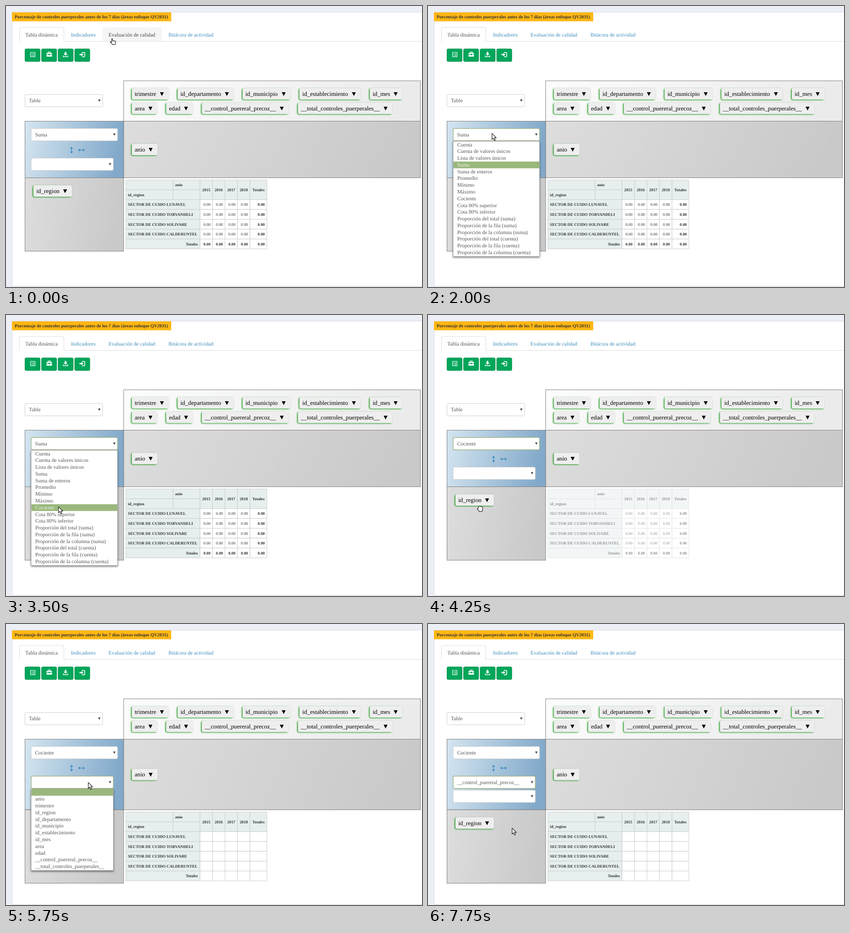
Recreate the animation shown at these times as an HTML page. Size 909 px wide and 616 px high, loop 8 s.

```html
<!DOCTYPE html>
<html lang="es">
<head>
<meta charset="utf-8">
<style>
html, body { margin: 0; width: 100%; height: 100%; overflow: hidden; background: #edeff7; }
svg { display: block; width: 909px; height: 616px; }
text { font-family: "Liberation Serif", "Times New Roman", serif; text-rendering: geometricPrecision; white-space: pre; }
</style>
</head>
<body>
<svg id="stage" viewBox="0 0 909 616" xmlns="http://www.w3.org/2000/svg">
  <defs>
    <linearGradient id="pale" x2="1" y2=".1"><stop stop-color="#fcfcfc"/><stop offset="1" stop-color="#ebebeb"/></linearGradient>
    <linearGradient id="gray" x2="1" y2=".1"><stop stop-color="#dddddd"/><stop offset="1" stop-color="#c9c9c9"/></linearGradient>
    <linearGradient id="blue" x2="1" y2=".1"><stop stop-color="#d4e5f0"/><stop offset="1" stop-color="#82a9ca"/></linearGradient>
    <filter id="glow" x="-20%" y="-40%" width="140%" height="180%"><feDropShadow dx="-1.5" dy="1" stdDeviation="1.7" flood-color="#0a930a"/></filter>
    <filter id="drop" x="-10%" y="-10%" width="120%" height="120%"><feDropShadow dx="0" dy="2" stdDeviation="2.2" flood-color="#000" flood-opacity=".55"/></filter>
  </defs>
</svg>
<script>
const stage = document.getElementById('stage');
const BODY = 11.57, PILL = 13.23, CELL = 8.82;
const INK = '#555', LINK = '#3c8dbc';

function add(parent, tag, attrs, content) {
  const el = document.createElementNS(stage.namespaceURI, tag);
  for (const k in attrs) el.setAttribute(k, attrs[k]);
  if (content !== undefined) el.textContent = content;
  parent.append(el);
  return el;
}
const group = (parent = stage) => add(parent, 'g', {});
const box = (p, x0, y0, x1, y1, fill, stroke = 'none', more = {}) =>
  add(p, 'rect', { x: x0, y: y0, width: x1 - x0, height: y1 - y0, fill, stroke, ...more });
const label = (p, x, y, str, size, fill, more = {}) =>
  add(p, 'text', { x, y, 'font-size': size, fill, ...more }, str);
const path = (p, d, fill, stroke = 'none', more = {}) => add(p, 'path', { d, fill, stroke, ...more });
const show = (el, on) => el.setAttribute('display', on ? 'inline' : 'none');
const shift = (el, x, y) => el.setAttribute('transform', `translate(${x} ${y})`);

// page frame
box(stage, 13.5, 13.5, 930, 614.5, '#fff', '#d8dbe6');
box(stage, 13, 14, 361, 33.5, '#ffb714');
label(stage, 19, 27, 'Porcentaje de controles puerperales antes de los 7 días (áreas enfoque QV2031)', 9.95, '#333', { 'font-weight': 'bold' });

// tabs
path(stage, 'M29 77.5H909', 'none', '#ddd');
const hoverTab = path(stage, 'M211 77V50q0-3 3-3H337q3 0 3 3V77Z', '#f5f5f5');
path(stage, 'M29.5 78V50q0-3 3-3H123.5q3 0 3 3V78', '#fff', '#ddd');
label(stage, 42.3, 67, 'Tabla dinámica', BODY, INK);
label(stage, 142, 67, 'Indicadores', BODY, LINK);
const qualityTab = label(stage, 224, 67, 'Evaluación de calidad', BODY, LINK);
label(stage, 355, 67, 'Bitácora de actividad', BODY, LINK);

// toolbar
for (let i = 0; i < 4; i++)
  box(stage, 41.5 + i * 36.2, 94, 74.5 + i * 36.2, 121.7, '#00a65a', '#008d4c', { rx: 2.5 });
path(stage, 'M53.5 101.5H63.5V111.5H53.5ZM55 104.5h1.3M57.5 104.5H62M55 107h1.3M57.5 107H62M55 109.5h1.3M57.5 109.5H62', 'none', '#fff', { 'stroke-width': 1.1 });
path(stage, 'M92 102.5V101H97V102.5', 'none', '#fff', { 'stroke-width': 1.3 });
path(stage, 'M89.5 102.7H99.5l1 1V106H95.8v-1H93.2v1H88.5V103.7ZM88.5 107H93.2v1H95.8v-1H100.500V111H88.5Z', '#fff');
path(stage, 'M128.500 100.500h3.2V104.500h2.800L130.100 109 125.700 104.500h2.800ZM124.500 108.500h1.500V110.500H134.200V108.500h1.500V112H124.500Z', '#fff');
path(stage, 'M160.500 105.300h4V102.700L169 106.500 164.500 110.300V107.700h-4Z', '#fff');
path(stage, 'M166 101.800H170.500q1.500 0 1.500 1.500V109.800q0 1.500-1.500 1.500H166', 'none', '#fff', { 'stroke-width': 1.7 });

// pivot areas
const BORDER = '#7d7d7d';
box(stage, 257, 164, 905.5, 252.5, 'url(#pale)', BORDER);
const colsArea = box(stage, 257, 252.5, 905.5, 376.5, 'url(#gray)', BORDER);
const valuesArea = box(stage, 41.5, 252.5, 257, 376.5, 'url(#blue)', BORDER);
const rowsArea = box(stage, 41.5, 376.5, 257, 537.5, 'url(#gray)', BORDER);

function pill(p, x0, x1, y, str) {
  box(p, x0, y, x1, y + 25, '#eee', 'none', { rx: 4, filter: 'url(#glow)' });
  label(p, x0 + 6.2, y + 17, str, PILL, '#000');
  path(p, `M${x1 - 19.2} ${y + 9}h8.6l-4.3 8.300z`, '#000');
}
const control = '__control_puereral_precoz__', total = '__total_controles_puerperales__';
pill(stage, 275, 355.5, 180, 'trimestre');
pill(stage, 375, 497.5, 180, 'id_departamento');
pill(stage, 517, 621.7, 180, 'id_municipio');
pill(stage, 641.3, 775, 180, 'id_establecimiento');
pill(stage, 795, 866.3, 180, 'id_mes');
pill(stage, 275, 330.5, 211.7, 'area');
pill(stage, 350, 408.3, 211.7, 'edad');
pill(stage, 428, 617.5, 211.7, control);
pill(stage, 638, 844.3, 211.7, total);
const colPill = group();
pill(colPill, 275, 331, 302, 'anio');
const lower = group();
pill(lower, 60, 144, 393, 'id_region');

// dropdown fields
function field(x0, x1, y, str) {
  const g = group();
  const frame = box(g, x0 + .5, y + .5, x1 - .5, y + 27.5, '#fff', '#ccc', { rx: 2.5 });
  const text = label(g, x0 + 9, y + 17.7, str, BODY, INK);
  path(g, `M${x1 - 10.300} ${y + 11.5}h5.400l-2.700 5z`, '#444');
  return {
    g,
    set(value, focused) {
      text.textContent = value;
      frame.setAttribute('stroke', focused ? '#9fb384' : '#ccc');
      frame.setAttribute('stroke-width', focused ? 1.4 : 1);
    }
  };
}
field(41, 211.500, 193.500, 'Table');
const aggregator = field(54.500, 244.300, 268, 'Suma');
const numerator = field(54.500, 235, 333, '');
const denominator = field(54.500, 235, 363.700, '');

path(stage, 'M143.200 310V322M159 315.800H171', 'none', LINK, { 'stroke-width': 1.3 });
path(stage, 'M143.200 308.500l3.300 4.300h-6.600zM143.200 323.300l3.300-4.300h-6.600zM157.500 315.800l4.300-3.300v6.600zM172.500 315.800l-4.300-3.300v6.600z', LINK);

// results table
const table = group(lower), zeros = group(table);
const colX = [424, 451.300, 478.500, 505.800, 533.200, 570];
const rowY = i => 381.300 + i * 21.580;
const cell = (x0, r0, x1, r1, fill) => box(table, x0, rowY(r0), x1, rowY(r1), fill, '#cdcdcd');
const HEAD = '#e6eeee', DARK = '#333', bold = { 'font-weight': 'bold' };
const textY = r => rowY(r) + 13.900;

cell(262, 0, 365, 1, HEAD);
cell(365, 0, 424, 1, HEAD);
cell(262, 1, 365, 2, HEAD);
cell(365, 1, 424, 2, HEAD);
label(table, 369.500, textY(0), 'anio', CELL, DARK, bold);
label(table, 266.500, textY(1), 'id_region', CELL, DARK, bold);
['2015', '2016', '2017', '2018', 'Totales'].forEach((str, i) => {
  cell(colX[i], 0, colX[i + 1], 2, HEAD);
  label(table, (colX[i] + colX[i + 1]) / 2, textY(.5), str, CELL, DARK, { ...bold, 'text-anchor': 'middle' });
});
['SECTOR DE CUIDO LUNAVEL', 'SECTOR DE CUIDO TORVANDELI', 'SECTOR DE CUIDO SOLIVARE', 'SECTOR DE CUIDO CALDERUNTEL', 'Totales'].forEach((str, i) => {
  const r = i + 2, last = i === 4;
  cell(262, r, 424, r + 1, HEAD);
  label(table, last ? 419.300 : 266.500, textY(r), str, CELL, DARK, { ...bold, 'text-anchor': last ? 'end' : 'start' });
  for (let c = 0; c < 5; c++) {
    cell(colX[c], r, colX[c + 1], r + 1, '#fff');
    label(zeros, colX[c + 1] - 4.500, textY(r), '0.00', CELL, DARK,
      { 'text-anchor': 'end', 'font-weight': last || c === 4 ? 'bold' : 'normal' });
  }
});
table.append(zeros);

// option lists
const STEP = 14.770;
function optionList(x1, y, items) {
  const g = group();
  box(g, 55, y, x1, y + items.length * STEP + 1.500, '#fff', '#8f8f8f', { filter: 'url(#drop)', 'stroke-width': .8 });
  const bar = box(g, 55.500, y, x1 - .5, y + STEP, '#9ab87c');
  const texts = items.map((str, i) => label(g, 64, y + i * STEP + 11.200, str, BODY, INK));
  return {
    set(index) {
      show(g, index >= 0);
      bar.setAttribute('y', y + index * STEP + .3);
      texts.forEach((el, i) => el.setAttribute('fill', i === index ? '#f0f4ea' : INK));
    }
  };
}
const functions = optionList(243.800, 296.400, ['Cuenta', 'Cuenta de valores únicos', 'Lista de valores únicos', 'Suma',
  'Suma de enteros', 'Promedio', 'Mínimo', 'Máximo', 'Cociente', 'Cota 80% superior', 'Cota 80% inferior',
  'Proporción del total (suma)', 'Proporción de la fila (suma)', 'Proporción de la columna (suma)',
  'Proporción del total (cuenta)', 'Proporción de la fila (cuenta)', 'Proporción de la columna (cuenta)']);
const fields = optionList(234.700, 361.400, ['', 'anio', 'trimestre', 'id_region', 'id_departamento', 'id_municipio',
  'id_establecimiento', 'id_mes', 'area', 'edad', control, total]);

// pointers
const outline = { 'stroke-width': 1.100, 'stroke-linejoin': 'round' };
const pointers = {
  arrow: path(stage, 'M.8 1.300V14.500L3.800 11.700 6 16.700 8.200 15.700 6.100 10.900H10.200Z', '#fff', '#111', outline),
  hand: path(stage, 'M3.800 8.500V1.700q0-1.100 1.100-1.100t1.100 1.100V5.400q1-.6 2 .2 1-.5 2 .4 1.700-.4 2.500 1V10q0 1.500-1 2.500V13.700H5.200V12.300L1 8.700q-.5-1.300.6-1.500 1 0 2.200 1.300Z', '#fff', '#111', outline),
  fist: path(stage, 'M3 6V3q0-1.400 1.300-1.300 1-.9 2 0 1.200-.7 2.200.2 1-.4 1.800.6 1.700-.2 2.100 1.300V8q0 1.600-1 2.600V12.500H4.300V11L1 8.300V6.700Q1.500 5.600 3 6Z', '#fff', '#111', outline)
};

// each entry holds from its start time until the next one
const pointerSteps = [
  [0, 'hand', 227, 71], [250, 'hand', 227, 89], [500, 'arrow', 207, 128], [750, 'arrow', 184, 183],
  [1000, 'arrow', 151, 251], [1250, 'arrow', 142, 271], [1500, 'arrow', 139, 278], [2500, 'arrow', 136, 298],
  [2750, 'arrow', 130, 357], [3000, 'arrow', 120, 408], [3250, 'arrow', 118, 423], [3500, 'arrow', 114, 419],
  [4250, 'fist', 107, 418], [4500, 'arrow', 118, 412], [4750, 'arrow', 137, 378], [5000, 'arrow', 167, 353],
  [5250, 'arrow', 179, 346], [6750, 'arrow', 176, 510], [7000, 'arrow', 175, 510], [7750, 'arrow', 183, 446]
];
const functionSteps = [[0, -1], [2000, 3], [2500, 0], [2750, 4], [3000, 7], [3250, 8], [4250, -1]];
const fieldSteps = [[0, -1], [5750, 0], [6750, 10], [7500, -1]];
const at = (steps, t) => steps.findLast(s => s[0] <= t).slice(1);

function draw(t) {
  const tabHover = t < 500, grown = t >= 4500;
  show(hoverTab, tabHover);
  qualityTab.setAttribute('fill', tabHover ? '#444' : LINK);

  const extra = grown ? 30.700 : 0;
  colsArea.setAttribute('height', 124 + extra);
  valuesArea.setAttribute('height', 124 + extra);
  rowsArea.setAttribute('y', 376.500 + extra);
  shift(lower, 0, extra);
  shift(colPill, 0, extra / 2);
  show(zeros, !grown);
  table.setAttribute('opacity', t >= 4250 && !grown ? .5 : 1);

  aggregator.set(t < 4250 ? 'Suma' : 'Cociente', t >= 2000 && t < 5750);
  numerator.set(t < 7500 ? '' : control, t >= 5750);
  show(denominator.g, grown);
  functions.set(...at(functionSteps, t));
  fields.set(...at(fieldSteps, t));

  const [kind, x, y] = at(pointerSteps, t);
  for (const name in pointers) show(pointers[name], name === kind);
  shift(pointers[kind], x, y);
}

const start = performance.now();
function tick() {
  draw((performance.now() - start) % 8000);
  requestAnimationFrame(tick);
}
draw(0);
requestAnimationFrame(tick);
</script>
</body>
</html>
```
